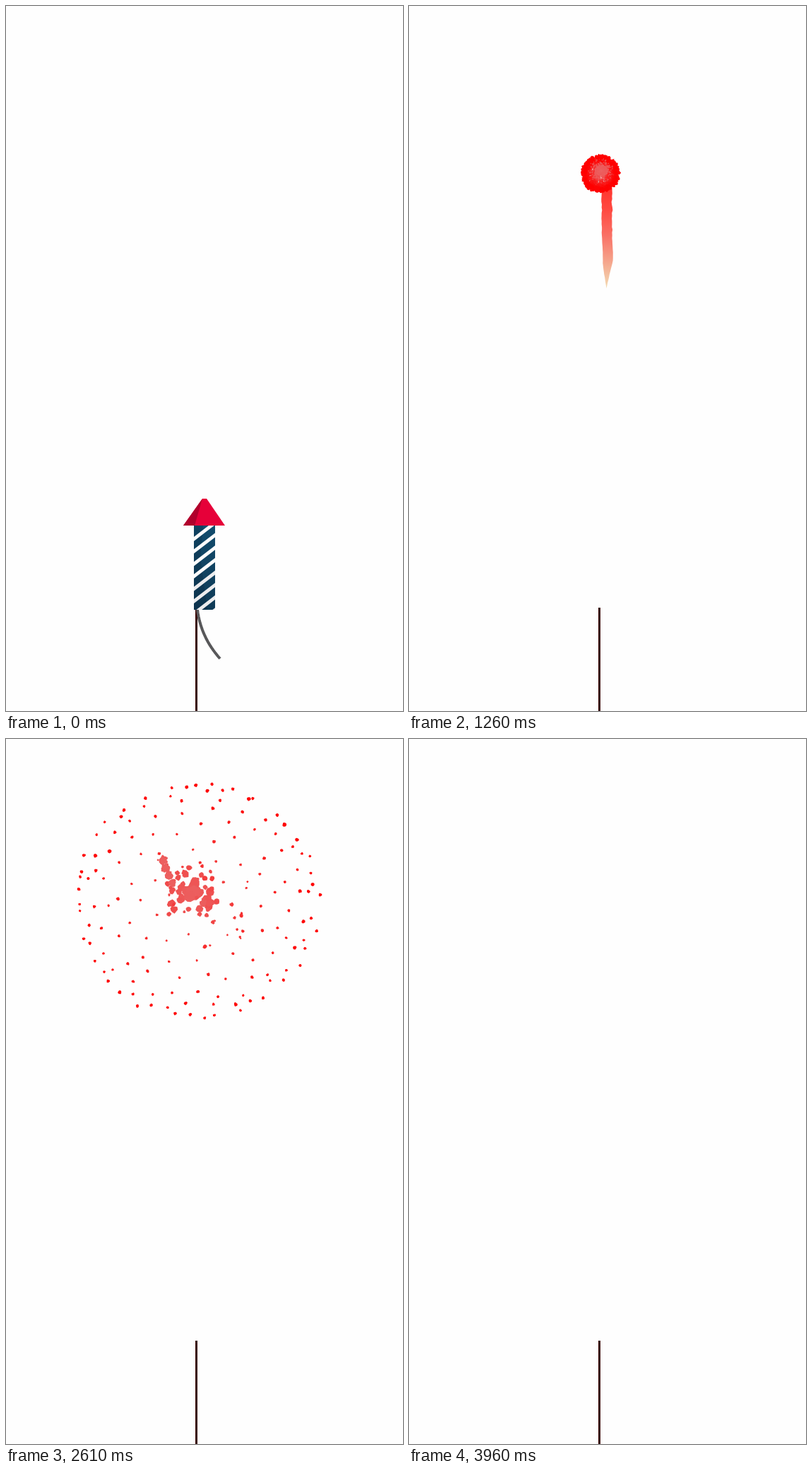
These frames come from a looping animation (562x996 px, 4050 ms). An HTML page with a canvas:

```html
<!DOCTYPE html>
<html lang="en">
<head>
<meta charset="utf-8">
<title>Firework</title>
<style>
  html, body { margin: 0; width: 100%; height: 100%; overflow: hidden; background: #fefefe; }
  canvas { display: block; width: 562px; height: 996px; }
</style>
</head>
<body>
<canvas id="stage" width="562" height="996"></canvas>
<script>
const ctx = document.getElementById('stage').getContext('2d');
const LOOP = 4050, STEP = 90, TAU = Math.PI * 2, GOLDEN = Math.PI * (3 - Math.sqrt(5));
const LIFTOFF = 540, BURST = 1260;
const clamp = v => Math.max(0, Math.min(1, v));
const mix = (a, b, k) => a + (b - a) * k;
const ramp = (t, from, to) => clamp((t - from) / (to - from));

function random(seed) {
  return () => {
    seed = (seed + 0x6D2B79F5) | 0;
    let x = Math.imul(seed ^ (seed >>> 15), 1 | seed);
    x = (x + Math.imul(x ^ (x >>> 7), 61 | x)) ^ x;
    return ((x ^ (x >>> 14)) >>> 0) / 4294967296;
  };
}

function poly(points, fill) {
  ctx.beginPath();
  points.forEach(([x, y]) => ctx.lineTo(x, y));
  ctx.closePath();
  ctx.fillStyle = fill;
  ctx.fill();
}

// Irregular spot, optionally stretched along an angle.
function spot(x, y, r, fill, rnd, stretch = 1, angle = 0) {
  if (r < 0.25) return;
  const points = [], count = r > 12 ? 40 : 9;
  const c = Math.cos(angle), s = Math.sin(angle);
  for (let i = 0; i < count; i++) {
    const a = i / count * TAU, q = r * mix(0.78, 1.18, rnd());
    const u = Math.cos(a) * q * stretch, v = Math.sin(a) * q;
    points.push([x + u * c - v * s, y + u * s + v * c]);
  }
  poly(points, fill);
}

// Loose cloud of spots, denser and larger towards its middle.
function scatter(x, y, spread, count, size, reach, rnd) {
  for (let i = 0; i < count; i++) {
    const a = rnd() * TAU, k = rnd() ** 1.2;
    const d = spread * k, r = size * mix(1, 0.35, k) * mix(0.5, 1.2, rnd());
    spot(x + Math.cos(a) * d, y + Math.sin(a) * d, r, heat(d, reach), rnd);
  }
}

// Coral in the middle, pure red at the rim.
function heat(d, reach) {
  const k = clamp(d / reach) ** 0.8;
  return `rgb(${mix(236, 255, k) | 0},${mix(98, 0, k) | 0},${mix(98, 0, k) | 0})`;
}

function drawRocket(lift) {
  ctx.save();
  ctx.translate(0, -lift);
  const body = ctx.createLinearGradient(0, 734, 0, 853);
  body.addColorStop(0, '#124c6d');
  body.addColorStop(1, '#0f3a56');
  ctx.fillStyle = body;
  ctx.fillRect(266, 734, 30, 119);
  ctx.save();
  ctx.beginPath();
  ctx.rect(266, 734, 30, 119);
  ctx.clip();
  poly([[266, 734], [279, 734], [275, 780], [285, 853], [266, 853]], 'rgba(5,25,45,.2)');
  for (let y = 750; y < 880; y += 17.6) {
    poly([[266, y], [296, y - 23], [296, y - 17], [266, y + 6]], y > 805 ? '#ececee' : '#fefefe');
  }
  ctx.restore();
  poly([[278, 696], [284, 696], [310, 734], [251, 734]], '#e60039');
  poly([[278, 696], [267, 734], [251, 734]], '#b0002c');
  ctx.restore();
}

function fuseAt(k) {
  const j = 1 - k;
  return [j * j * 271 + 2 * j * k * 276 + k * k * 303,
          j * j * 853 + 2 * j * k * 892 + k * k * 922];
}

function drawFuse(length) {
  ctx.beginPath();
  for (let i = 0; i <= 16; i++) ctx.lineTo(...fuseAt(length * i / 16));
  ctx.lineWidth = 4;
  ctx.strokeStyle = '#58585a';
  ctx.stroke();
}

function drawSparks(t, [x, y]) {
  const rnd = random(t + 5);
  for (let i = 0; i < 14; i++) {
    const a = mix(-0.5, 1.6, rnd()), d = 4 + rnd() ** 2 * 85;
    spot(x + Math.cos(a) * d, y + Math.sin(a) * d * 0.8, 1 + rnd() * 1.6,
         i % 2 ? '#ff9a2e' : '#ff4a32', rnd);
  }
}

function drawTrail(t) {
  const top = mix(673, 249, ramp(t, LIFTOFF, BURST));
  const tail = top + mix(204, 250, ramp(t, LIFTOFF, 1080)) - 100 * ramp(t, 1080, BURST);
  const rnd = random(t), left = [], right = [], n = 38;
  let sway = 0;
  for (let i = 0; i <= n; i++) {
    const k = i / n;
    const w = 7 * clamp((k + 0.01) / 0.04) ** 0.5 * clamp((1 - k) / 0.25);
    const x = 279.5 + sway * clamp((1 - k) * 5), y = mix(top, tail, k);
    sway = clamp(0.5 + (sway + rnd() - 0.5) / 4) * 4 - 2;
    left.push([x - w - rnd() * (1 - k), y]);
    right.unshift([x + w + rnd() * (1 - k), y]);
  }
  const g = ctx.createLinearGradient(0, top, 0, tail);
  ['#ff3029', '#ff4840', '#f97065', '#f5a58c', '#f3dcb4'].forEach((c, i) => g.addColorStop(i / 4, c));
  poly(left.concat(right), g);
}

// Stars spread evenly over a half sphere, so they crowd at the rim when seen flat.
const stars = Array.from({ length: 150 }, (_, i) => {
  const rnd = random(i * 977 + 3), depth = 1 - (i + 0.5) / 150;
  const angle = i * GOLDEN + mix(-0.08, 0.08, rnd());
  const reach = Math.sqrt(1 - depth * depth) * mix(0.96, 1.01, rnd());
  const low = Math.sin(angle) * reach > 0.5;
  return { angle, reach, scale: mix(0.8, 1.2, rnd()), end: mix(3000, low ? 3320 : 3860, rnd()) };
});

function drawStars(t, cx, cy) {
  const radius = 208 * (1 - Math.exp((1160 - t) / 800));
  const size = mix(3, 0.9, ramp(t, 1900, 3870));
  const stretch = mix(1.5, 1, ramp(t, BURST, 2160));
  stars.forEach((s, i) => {
    const r = size * s.scale * mix(0.8, 1, s.reach) * ramp(t, s.end, s.end - 500) ** 0.3;
    const d = radius * s.reach;
    spot(cx + Math.cos(s.angle) * d, cy + Math.sin(s.angle) * d * 0.97, r,
         heat(d, radius), random(i + t), stretch, s.angle);
  });
}

function drawCore(t, cx, cy) {
  const swell = ramp(t, BURST, 2160), fade = ramp(t, 2160, 2610);
  const x = cx + 1 - 7 * fade, y = cy - 4;
  const r = mix(8, 31, swell ** 1.3) * (1 - fade);
  spot(x, y, r, '#ec6262', random(t + 7), mix(1.2, 1, swell));
  scatter(x, y, mix(18, 44, swell), mix(240, 90, swell) * (1 - fade),
          mix(2.2, 5, swell), 170, random(t + 90));
}

// What the core breaks up into, with a plume to the upper left.
function drawClumps(t, cx, cy) {
  const size = ramp(t, 1900, 2610) * ramp(t, 3240, 2700);
  scatter(cx - 8, cy - 9, 46, 46, 9 * size, 240, random(21));
  scatter(cx + 8, cy + 5, 80, 28, 5 * size, 130, random(34));
  const loose = ramp(t, 2610, 1900), top = mix(172, 196, loose);
  for (let k = 0; k < 1; k += 0.25) {
    scatter(mix(222, 240, k), mix(top, 214, k), mix(7, 18, loose) * (1 - k / 2),
            28, mix(4.5, 2, loose) * clamp(size * 3), 170, random(t + k * 8));
  }
}

// The last pieces: x, y, radius.
const embers = [[254, 208, 10], [256, 220, 6], [307, 227, 4.6], [204, 244, 4.2], [256, 314, 4.2]];

function drawEmbers(t) {
  const glow = ramp(t, 2700, 3150) * ramp(t, 3900, 3330);
  embers.forEach(([x, y, r], i) => {
    spot(x, y, r * glow, heat(i, 4), random(i + 30));
  });
}

function draw(t) {
  ctx.fillStyle = '#fefefe';
  ctx.fillRect(0, 0, 562, 996);
  ctx.fillStyle = '#380300';
  ctx.fillRect(268, 850, 3, 146);

  if (t < LIFTOFF) {
    const length = ramp(t, 450, 0);
    if (length > 0) drawFuse(length);
    if (t > 0) drawSparks(t, fuseAt(length));
    drawRocket(47 * ramp(t, 270, 450) ** 2);
  } else if (t <= BURST) {
    drawTrail(t);
  }
  if (t >= BURST && t < 3960) {
    const cx = 271, cy = mix(237, 229, ramp(t, BURST, 2160));
    drawStars(t, cx, cy);
    drawClumps(t, cx, cy);
    drawCore(t, cx, cy);
    drawEmbers(t);
  }
}

const start = performance.now();
function tick(now) {
  const t = Math.max(0, now - start) % LOOP;
  draw(Math.floor(t / STEP) * STEP);
  requestAnimationFrame(tick);
}
draw(0);
requestAnimationFrame(tick);
</script>
</body>
</html>
```
